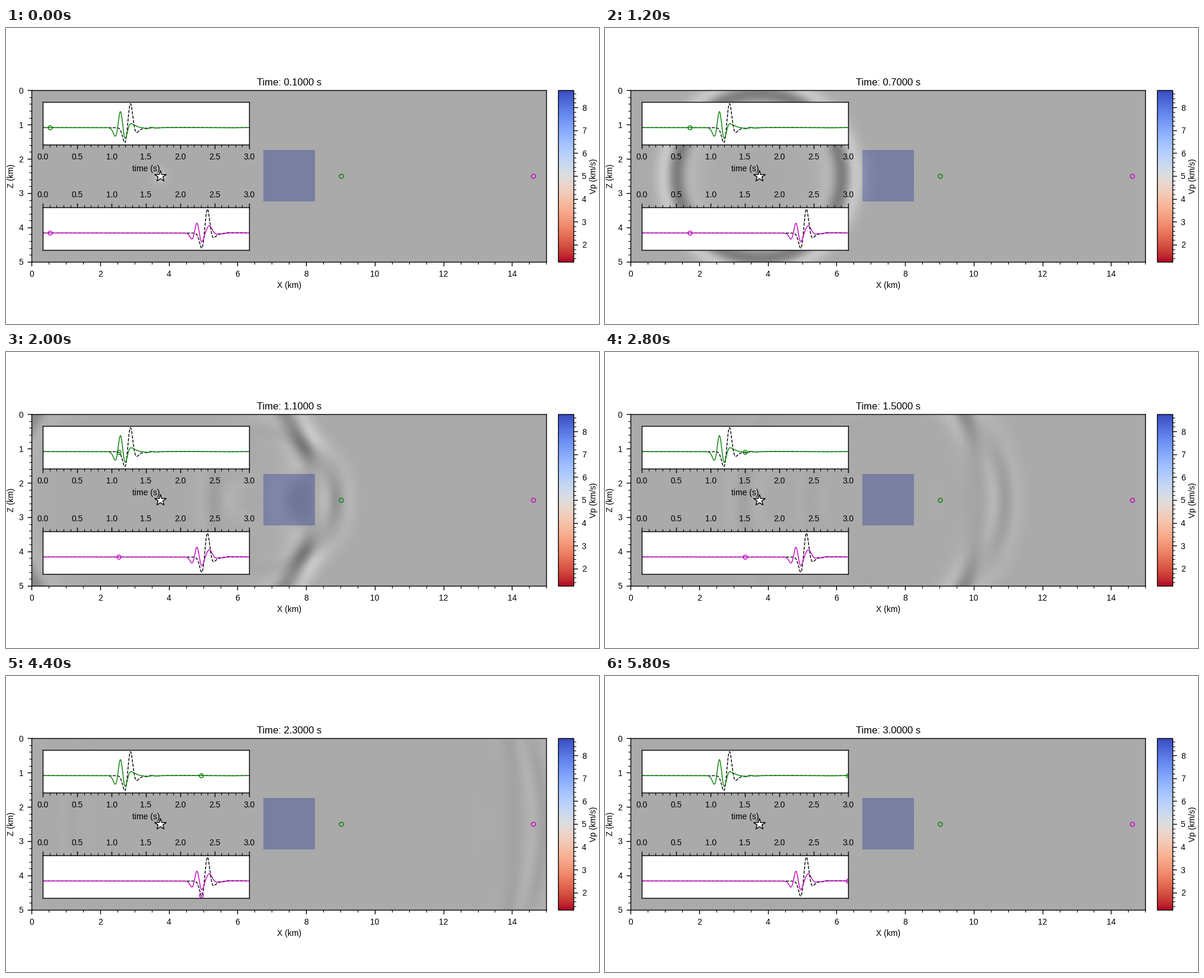
Animation of 1000x500 px, one loop 6 s. Source, as a matplotlib script:

```python
import numpy as np
import matplotlib.pyplot as plt
from matplotlib.animation import FuncAnimation
from matplotlib.cm import ScalarMappable
from matplotlib.colors import Normalize
from matplotlib.ticker import AutoMinorLocator, MultipleLocator

W, H, DPI = 1000, 500, 100
FRAMES, INTERVAL = 30, 200

plt.rcParams.update({
    "font.family": "Liberation Sans", "font.size": 10, "axes.titlesize": 12,
    "axes.linewidth": 1.0, "lines.linewidth": 1.0,
    "xtick.major.size": 5, "ytick.major.size": 5,
    "xtick.minor.size": 3, "ytick.minor.size": 3,
    "xtick.major.pad": 5, "ytick.major.pad": 5,
    "xtick.major.width": 1.0, "ytick.major.width": 1.0,
    "xtick.minor.width": 0.8, "ytick.minor.width": 0.8,
})

# Acoustic model, in km and s
LX, LZ, DX, DT = 15.0, 5.0, 0.05, 0.002
NX, NZ, PAD = 300, 100, 90
V0, V1 = 5.0, 8.75
F0, T0 = 5.0, 0.2
SRC_X, MID_Z = 3.75, 2.5
REC_X = (9.02, 14.62)
STEPS = 1500
PER_FRAME = STEPS // FRAMES
STENCIL = (-205 / 72, 8 / 5, -1 / 5, 8 / 315, -1 / 560)


def ricker(t):
    a = (np.pi * F0 * (t - T0)) ** 2
    return (1 - 2 * a) * np.exp(-a)


def laplacian(u, out):
    r = 4
    nz, nx = u.shape
    core = out[r:-r, r:-r]
    core[:] = 2 * STENCIL[0] * u[r:-r, r:-r]
    for k in range(1, 5):
        core += STENCIL[k] * (u[r + k:nz - r + k, r:-r] + u[r - k:nz - r - k, r:-r]
                              + u[r:-r, r + k:nx - r + k] + u[r:-r, r - k:nx - r - k])


def ramp(n):
    """Depth into the absorbing border, 0 inside and 1 at the rim."""
    i = np.arange(n + 2 * PAD)
    return np.clip(np.maximum(PAD - i, i - (n + PAD - 1)) / PAD, 0, 1)


def propagate(vel):
    """Return wavefield snapshots and the receiver traces."""
    v = np.pad(vel, PAD, mode="edge")
    g = 13 * (ramp(NZ)[:, None] ** 3 + ramp(NX)[None, :] ** 3) * DT
    gain = ((v * DT / DX) ** 2 / (1 + g)).astype(np.float32)
    now = (2 / (1 + g)).astype(np.float32)
    past = ((1 - g) / (1 + g)).astype(np.float32)
    u, prev, lap = (np.zeros(v.shape, np.float32) for _ in range(3))
    zi, xi = PAD + NZ // 2, PAD + round(SRC_X / DX)
    cols = [PAD + int(x / DX + 0.5) for x in REC_X]
    snaps, traces = [], np.zeros((len(REC_X), STEPS + 1))
    for n in range(1, STEPS + 1):
        laplacian(u, lap)
        nxt = now * u - past * prev + gain * lap
        nxt[zi - 1:zi + 1, xi - 1:xi + 1] += ricker((n - 1) * DT) * DT ** 2
        prev, u = u, nxt
        traces[:, n] = [u[zi - 1:zi + 1, c].mean() for c in cols]
        if n % PER_FRAME == 0:
            snaps.append(u[PAD:-PAD, PAD:-PAD].copy())
    return snaps, traces


plain = np.full((NZ, NX), V0)
model = plain.copy()
model[35:65, 135:165] = V1
ref_snaps, ref_traces = propagate(plain)
snaps, traces = propagate(model)
time = np.arange(STEPS + 1) * DT
clip = ref_snaps[4].max() / 0.6

fig = plt.figure(figsize=(W / DPI, H / DPI), dpi=DPI, facecolor="white")


def axes_px(x0, y0, x1, y1):
    """Axes from a pixel box measured from the top left."""
    return fig.add_axes([x0 / W, 1 - y1 / H, (x1 - x0) / W, (y1 - y0) / H])


def ring(ax, x, y, color):
    return ax.plot([x], [y], "o", ms=5, mfc="none", mec=color, mew=1.0)[0]


ax = axes_px(43.2, 105.2, 911.3, 394.8)
extent = (0, LX, LZ, 0)
wave = ax.imshow(snaps[0], cmap="Greys", vmin=-clip, vmax=clip, extent=extent,
                 aspect="auto", interpolation="bilinear")
ax.imshow(model, cmap="coolwarm_r", vmin=1.25, vmax=V1, alpha=0.3, extent=extent,
          aspect="auto", interpolation="nearest")
ax.plot([SRC_X], [MID_Z], "*", ms=15, mfc="white", mec="black", mew=1.0)
ax.set(xlim=(0, LX), ylim=(LZ, 0), xlabel="X (km)", ylabel="Z (km)")
ax.xaxis.set_major_locator(MultipleLocator(2))
ax.yaxis.set_major_locator(MultipleLocator(1))
ax.xaxis.set_minor_locator(AutoMinorLocator(4))
ax.yaxis.set_minor_locator(AutoMinorLocator(5))
title = ax.set_title("")

cax = axes_px(931, 105.2, 957, 394.8)
bar = fig.colorbar(ScalarMappable(Normalize(1.25, V1), "coolwarm_r"), cax=cax,
                   label="Vp (km/s)")
bar.set_ticks(MultipleLocator(1))
cax.yaxis.set_minor_locator(AutoMinorLocator(5))

dots = []
for i, (top, color) in enumerate([(125, "g"), (303, "m")]):
    ring(ax, REC_X[i], MID_Z, color)
    sub = axes_px(62.2, top, 409.8, top + 72.2)
    sub.plot(time, ref_traces[i], "k--")
    sub.plot(time, traces[i], color=color)
    span = ref_traces[i].max() / 0.56
    sub.set(xlim=(0, 3), ylim=(-0.4 * span, 0.6 * span), yticks=[])
    sub.xaxis.set_major_locator(MultipleLocator(0.5))
    sub.xaxis.set_minor_locator(AutoMinorLocator(5))
    if i == 0:
        sub.set_xlabel("time (s)")
    else:
        sub.xaxis.tick_top()
    dots.append(ring(sub, 0, 0, color))


def draw(frame):
    n = (frame + 1) * PER_FRAME
    wave.set_data(snaps[frame])
    title.set_text(f"Time: {time[n]:.4f} s")
    for dot, trace in zip(dots, ref_traces):
        dot.set_data([time[n]], [trace[n]])
    return [wave, title, *dots]


anim = FuncAnimation(fig, draw, frames=FRAMES, interval=INTERVAL,
                     init_func=lambda: draw(0), repeat=True, repeat_delay=0, blit=False)
plt.show()
```
